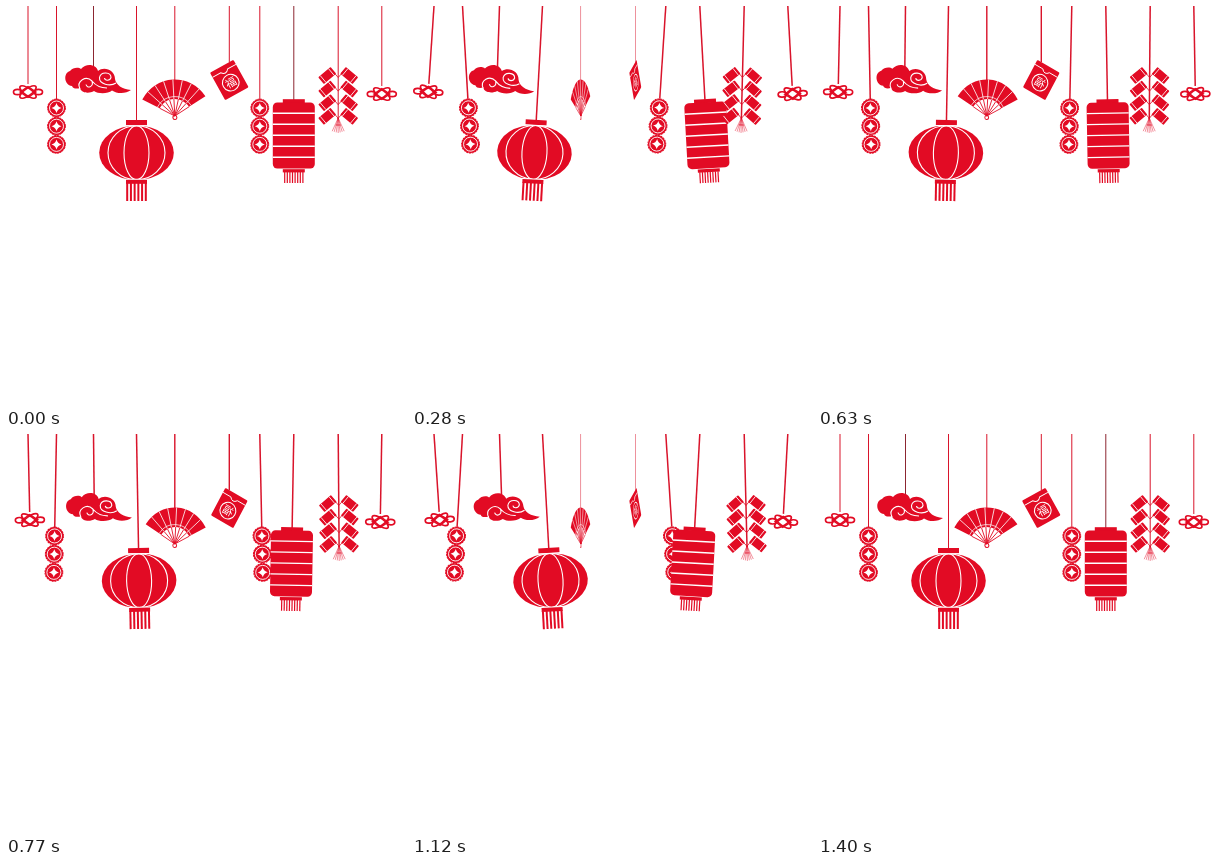
Write an HTML page that moves like this. It is 400 by 400 pixels and loops after 1.47 s.

```html
<!DOCTYPE html>
<html lang="zh">
<head>
<meta charset="utf-8">
<title>Hanging ornaments</title>
<style>
  html, body { margin: 0; width: 100%; height: 100%; overflow: hidden; background: #fff; }
  svg { display: block; width: 100%; height: 100%; }
  .red { fill: #e20b24; }
  .line { fill: none; stroke: #e20b24; }
  .cut { fill: none; stroke: #fff; stroke-width: 1.1; }
  .white { fill: #fff; }
  .string { stroke: #d9142b; stroke-width: 1; }
  .dark { stroke: #8c2631; }
  .swung .string { stroke: #d9142b; stroke-width: 1.5; }
  text { font: 500 11px "Noto Sans CJK SC", "Noto Sans CJK", sans-serif; fill: #fff; text-anchor: middle; }
</style>
</head>
<body>
<svg id="stage" viewBox="0 0 400 400"></svg>
<script>
const STEP = 70, STEPS = 20, LOOP = 1470;
const stage = document.getElementById('stage');

const range = (n, f) => Array.from({ length: n }, (_, i) => f(i)).join('');
const path = (cls, d, extra = '') => `<path class="${cls}" d="${d}" ${extra}/>`;
const rect = (cls, x, y, w, h, extra = '') =>
  `<rect class="${cls}" x="${x}" y="${y}" width="${w}" height="${h}" ${extra}/>`;
const oval = (cls, x, y, rx, ry, extra = '') =>
  `<ellipse class="${cls}" cx="${x}" cy="${y}" rx="${rx}" ry="${ry}" ${extra}/>`;
const string = (end, cls = '') => path('string ' + cls, `M0-6V${end}`);

// Every ornament is drawn around x = 0, the line of its string.
function knot(y) {
  const loops = [35, -35].map(a =>
    oval('line', 0, 0, 9.6, 3.6, `transform="rotate(${a})" stroke-width="1.7"`)).join('');
  const sides = [-10.5, 10.5].map(x => oval('line', x, 0, 4, 2.7, 'stroke-width="1.7"')).join('');
  return string(y - 8) + `<g transform="translate(0 ${y})">` + loops + sides +
    path('line', 'M-8 0L0-5.5L8 0L0 5.5Z', 'stroke-width="1.4"') + '</g>';
}

function coins() {
  const star = 'M0-5Q1-1 5 0Q1 1 0 5Q-1 1-5 0Q-1-1 0-5Z';
  return string(93) + [102, 120.2, 138.4].map(y =>
    `<g transform="translate(0 ${y})">` + oval('red', 0, 0, 8.9, 8.9) +
    oval('line', 0, 0, 8.9, 8.9, 'stroke-width="1" stroke-dasharray="2 .8"') +
    oval('cut', 0, 0, 7, 7, 'style="stroke-width:.9"') +
    path('white', star) + '</g>').join('');
}

function cloud() {
  return string(61, 'dark') + '<g transform="translate(-87.5 0)">' +
    path('red', 'M66 80C58 79 57 67 64 65C67 61 73 61 75 63C80 57 90 58 92 65' +
      'C98 60 109 64 109 73C110 79 116 83 125 84C120 88 111 88 106 84.5' +
      'C102 88 92 88 88 85C83 88 75 87 74 82C71 83 67 83 66 80Z') +
    path('cut', 'M110 77C104 81 93 78 93.5 71.5C95 65 105 66 105 71.5C104 75 99 75 98.5 72') +
    path('cut', 'M74 83C70 75 80 69 86 75C88 81 81 83 80 78.5M86 75C90 80 96 82 101 82') +
    '</g>';
}

function lantern() {
  return string(115) + oval('red', 0, 146.7, 37.3, 27.3) +
    oval('cut', 0, 146.7, 28.5, 27) + oval('cut', 0, 146.7, 12.5, 27) +
    rect('red', -10.5, 114, 21, 5.3) + path('cut', 'M-11 119.7H11M-11 173.3H11') +
    rect('red', -10.5, 173.8, 21, 4) +
    range(6, i => rect('red', -10.3 + i * 3.72, 177, 2, 18));
}

function fan() {
  const R = 36.5, r = 17;
  const at = (a, d) => [d * Math.sin(a), 110 - d * Math.cos(a)].map(v => v.toFixed(1)).join(' ');
  const half = Math.PI / 3, angle = (i, n) => half * (2 * i / n - 1);
  const arc = d => `M${at(-half, d)}A${d} ${d} 0 0 1 ${at(half, d)}`;
  return string(75) + '<g transform="rotate(-3 0 110)">' +
    path('red', `${arc(R)}L${at(half, r)}A${r} ${r} 0 0 0 ${at(-half, r)}Z`) +
    path('cut', range(7, i => `M${at(angle(i + 1, 8), r)}L${at(angle(i + 1, 8), R)}`), 'style="stroke-width:.8"') +
    path('cut', arc(19.5), 'style="stroke-width:.7"') +
    path('line', range(9, i => `M0 110L${at(angle(i, 8), r)}`), 'stroke-width=".9"') +
    oval('line', 0, 111.5, 2, 2, 'stroke-width="1"') + '</g>';
}

function envelope() {
  return string(56) + '<g transform="translate(0 74) rotate(-29)">' +
    rect('red', -13.4, -15.6, 26.8, 31.2, 'rx="1"') +
    path('cut', 'M-13.4-10.5H-4Q0-5.5 4-10.5H13.4', 'style="stroke-width:.9"') +
    oval('cut', 0, 3, 8.3, 8.3) + '<text y="7">福</text></g>';
}

function tube() {
  return string(94, 'dark') + rect('red', -11, 93.2, 22, 4) +
    rect('red', -21, 96.5, 42, 66, 'rx="4.5"') +
    path('cut', range(5, i => `M-21 ${107.3 + i * 11}H21`), 'style="stroke-width:1.4"') +
    rect('red', -11, 163.2, 22, 3.2) +
    range(8, i => rect('red', -9.7 + i * 2.6, 166, 1.2, 11));
}

function crackers() {
  const one = (side, y) =>
    `<g transform="translate(${side * 11} ${y}) scale(${side} 1) rotate(40)">` +
    rect('red', -8, -4.4, 16, 8.8, 'rx=".8"') +
    path('cut', 'M-5.4-4.4V4.4M5.4-4.4V4.4', 'style="stroke-width:.8"') + '</g>' +
    path('line', `M0 ${y + 2}L${side * 6} ${y - 5}`, 'stroke-width=".8"');
  return string(113) + range(4, i => one(-1, 69.5 + i * 13.6) + one(1, 69.5 + i * 13.6)) +
    path('line', range(7, i => `M0 112L${-6 + i * 2} ${127 - Math.abs(i - 3) * .6}`),
      'stroke-width=".6" opacity=".75"') +
    path('line', 'M-2.5 119H2.5', 'stroke-width=".8"');
}

// [x, art, swing in degrees]; no swing means a full turn about the string
const parts = [
  [22, knot(86), 4], [50.5, coins(), -3.5], [87.5, cloud(), 2],
  [130.5, lantern(), 3.3], [168.8, fan()], [223.3, envelope()],
  [253.8, coins(), 3.9], [287.8, tube(), -3.3], [332.2, crackers(), 1.5],
  [375.8, knot(88), -3.3]
].map(([x, art, swing]) => {
  const el = document.createElementNS('http://www.w3.org/2000/svg', 'g');
  el.innerHTML = art;
  stage.append(el);
  return { el, x, swing };
});

let last = -1;
function draw(now) {
  const step = Math.floor(now % LOOP / STEP) % STEPS;
  if (step !== last) {
    last = step;
    const phase = step / STEPS * 2 * Math.PI;
    const sin = Math.sin(phase), cos = Math.cos(phase);
    stage.classList.toggle('swung', step > 0);
    for (const { el, x, swing } of parts) {
      const move = swing ? `rotate(${(swing * sin).toFixed(3)})`
                         : `scale(${Math.abs(cos) < .02 ? .02 : cos.toFixed(4)} 1)`;
      el.setAttribute('transform', `translate(${x} 0) ${move}`);
    }
  }
}

const start = performance.now();
function tick() {
  draw(performance.now() - start);
  requestAnimationFrame(tick);
}
tick();
</script>
</body>
</html>
```
